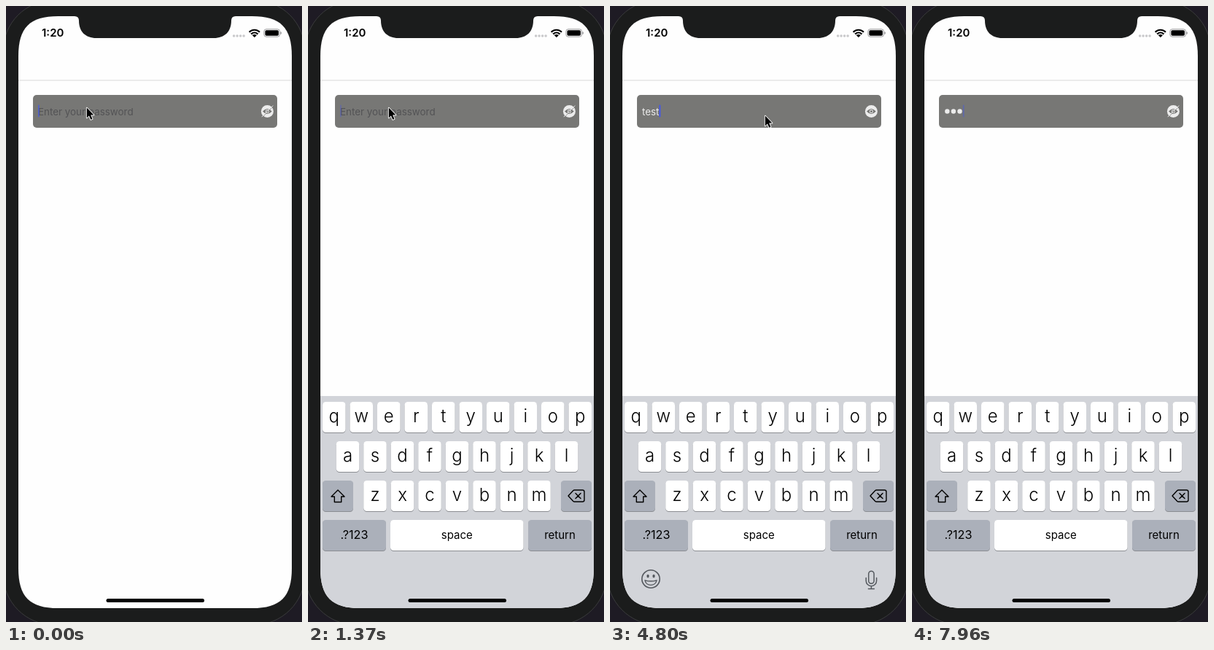
Write an HTML page with a canvas that moves like this. It is 406 px wide and 845 px high and loops after 8 s.

```html
<!DOCTYPE html>
<html lang="en">
<head>
<meta charset="utf-8">
<title>Password field</title>
<style>
html, body { margin: 0; width: 100%; height: 100%; overflow: hidden; background: #1b1c1c; }
canvas { display: block; width: 406px; height: 845px; }
</style>
</head>
<body>
<canvas id="stage" width="406" height="845"></canvas>
<script>
const ctx = document.getElementById('stage').getContext('2d');
const LOOP = 8000;
const FONT = 'Inter, Roboto, sans-serif';
const FIELD_FONT = `400 13.4px ${FONT}`;
const SCREEN = { x: 17, y: 14, w: 375, h: 812, r: 39 };
const KEYBOARD_HEIGHT = 291;

const KEYBOARD_AT = 665, REVEAL_AT = 3400, DELETE_AT = 6340, MASK_AT = 7500;
const TYPED_AT = [1780, 1960, 2140, 2310];

// The caret restarts its blink whenever the field is touched.
const BLINK_PERIOD = 870;
const BLINK_STARTS = [-440, 900, ...TYPED_AT, 2560, 3840, MASK_AT];

const GLIDE = 360, POINTER_HIDES_AT = 7880;
const POINTER_HOME = { x: 110, y: 139 };
const POINTER_STOPS = [
  { at: 2840, x: 318, y: 147 },
  { at: 3240, x: 354, y: 143 },
  { at: 4160, x: 348, y: 209 },
  { at: 4800, x: 212, y: 150 },
  { at: 5080, x: 395, y: 150 },
  { at: 5200, x: 353, y: 145 },
  { at: 5680, x: 306, y: 145 },
  { at: 6920, x: 390, y: 153 },
  { at: 7210, x: 356, y: 143 }
];

const clamp = v => Math.min(1, Math.max(0, v));
const smooth = v => v * v * (3 - 2 * v);
const revealed = t => t >= REVEAL_AT && t < MASK_AT;

function caretOpacity(t) {
  const start = BLINK_STARTS.filter(s => s <= t).pop();
  const phase = (t - start) % BLINK_PERIOD;
  return Math.max(clamp((500 - phase) / 90), clamp((phase - 800) / 70));
}

function pointerAt(t) {
  let pos = POINTER_HOME, arrived = 0;
  for (const stop of POINTER_STOPS) {
    const start = Math.max(arrived, stop.at - GLIDE);
    const k = smooth(clamp((t - start) / (stop.at - start)));
    pos = { x: pos.x + (stop.x - pos.x) * k, y: pos.y + (stop.y - pos.y) * k };
    arrived = stop.at;
  }
  return pos;
}

// Critically damped spring: 1 at the start, settling to 0.
function springLeft(ms) {
  const u = ms * .0151;
  return u > 9 ? 0 : (1 + u) * Math.exp(-u);
}

function roundRect(x, y, w, h, r, fill) {
  ctx.beginPath();
  ctx.roundRect(x, y, w, h, r);
  ctx.fillStyle = fill;
  ctx.fill();
}

function circle(x, y, r, fill) {
  ctx.beginPath();
  ctx.arc(x, y, r, 0, Math.PI * 2);
  ctx.fillStyle = fill;
  ctx.fill();
}

function text(str, x, y, font, color, align = 'left') {
  ctx.font = font;
  ctx.fillStyle = color;
  ctx.textAlign = align;
  ctx.fillText(str, x, y);
}

function strokePath(d, color, width, x = 0, y = 0) {
  ctx.save();
  ctx.translate(x, y);
  ctx.strokeStyle = color;
  ctx.lineWidth = width;
  ctx.lineCap = ctx.lineJoin = 'round';
  ctx.stroke(new Path2D(d));
  ctx.restore();
}

// Rounded rectangle whose corners ease into the sides.
function softRect({ x, y, w, h, r }) {
  const reach = r * 1.4, pull = r * .4;
  ctx.beginPath();
  for (let i = 0; i < 4; i++) {
    const right = i === 1 || i === 2, bottom = i > 1;
    const cx = x + (right ? w : 0), cy = y + (bottom ? h : 0);
    const dx = right ? -1 : 1, dy = bottom ? -1 : 1;
    const onSide = d => [cx, cy + dy * d], onEdge = d => [cx + dx * d, cy];
    const [from, to] = i % 2 ? [onEdge, onSide] : [onSide, onEdge];
    ctx.lineTo(...from(reach));
    ctx.bezierCurveTo(...from(pull), ...to(pull), ...to(reach));
  }
  ctx.closePath();
}

function drawBody() {
  ctx.fillStyle = '#1e1b24';
  ctx.fillRect(0, 0, 406, 845);
  roundRect(-4, -8, 414, 857, 70, '#1b1c1c');
  ctx.strokeStyle = '#3a3b3c';
  ctx.lineWidth = 1;
  ctx.stroke();
}

function drawNotch() {
  ctx.fillStyle = '#1b1c1c';
  ctx.fill(new Path2D('M94 13V14Q100 14 100 20C100 35 109 44 124 44H285C300 44 309 35 309 20Q309 14 315 14V13Z'));
}

function drawStatus() {
  text('1:20', 49, 42.3, `600 15px ${FONT}`, '#000');
  for (let i = 0; i < 4; i++) circle(312.6 + i * 4.5, 41, 1.75, '#c9c9cb');

  ctx.save();
  ctx.clip(new Path2D('M340.8 43L330.8 33V28H350.8V33Z'));
  for (const r of [10.8, 7, 3.4]) {
    circle(340.8, 42.5, r, '#000');
    if (r > 4) circle(340.8, 42.5, r - 2.1, '#fefefe');
  }
  ctx.restore();

  ctx.beginPath();
  ctx.roundRect(353.9, 31.8, 21.6, 10.4, 3);
  ctx.strokeStyle = '#99999b';
  ctx.lineWidth = 1;
  ctx.stroke();
  roundRect(355.4, 33.3, 18.6, 7.4, 1.8, '#000');
  roundRect(376.5, 35.2, 1.4, 3.8, [0, 1.4, 1.4, 0], '#99999b');
}

function drawEye(slashed) {
  const gray = '#777775', light = '#ececec', x = 358.4, y = 144.5;
  circle(x, y, 8.5, light);
  ctx.fillStyle = gray;
  ctx.beginPath();
  ctx.moveTo(x - 6.4, y);
  ctx.quadraticCurveTo(x, y - 7.2, x + 6.4, y);
  ctx.quadraticCurveTo(x, y + 7.2, x - 6.4, y);
  ctx.fill();
  circle(x, y, 2.5, light);
  circle(x, y, 1.6, gray);
  if (slashed) {
    strokePath('M-5.5 5.5L5.5 -5.5', gray, .7, x + .6, y + .7);
    strokePath('M-7.4 7.4L7.6 -7.6', light, 1, x, y);
  }
}

function drawField(t) {
  const left = 44, base = 149.5, ink = '#ececec';
  const length = t >= DELETE_AT ? 3 : TYPED_AT.filter(at => t >= at).length;
  const value = 'test'.slice(0, length);
  let end = left;

  roundRect(37, 122, 335, 45, 5, '#777775');
  if (!value) {
    text('Enter your password', left, base, FIELD_FONT, '#535355');
  } else {
    const bullets = revealed(t) ? 0 : t < REVEAL_AT ? length - 1 : length;
    const rest = value.slice(bullets);
    for (let i = 0; i < bullets; i++) circle(48.3 + i * 8.6, 144.5, 3.2, ink);
    end += bullets * 8.6;
    text(rest, end, base, FIELD_FONT, ink);
    end += ctx.measureText(rest).width;
  }
  ctx.globalAlpha = caretOpacity(t);
  roundRect(end, 135.5, 1.8, 17, .9, '#4156f0');
  ctx.globalAlpha = 1;
  drawEye(!revealed(t));
}

function key(x, y, w, fill) {
  roundRect(x, y + 1, w, 42, 4.5, '#8b8d92');
  roundRect(x, y, w, 42, 4.5, fill);
}

function letterRow(letters, x, y) {
  [...letters].forEach((ch, i) => {
    const left = x + i * 37.5;
    key(left, y, 31.5, '#fff');
    text(ch, left + 15.75, y + 28, `300 24px ${FONT}`, '#000', 'center');
  });
}

function wideKey(label, size, x, w, fill) {
  key(x, 170, w, fill);
  text(label, x + w / 2, 196, `400 ${size}px ${FONT}`, '#000', 'center');
}

function drawEmojiAndMic() {
  const ink = '#54585e';
  ctx.beginPath();
  ctx.arc(56, 251, 12.2, 0, Math.PI * 2);
  ctx.strokeStyle = ink;
  ctx.lineWidth = 1.6;
  ctx.stroke();
  for (const x of [52, 60]) roundRect(x - 1.5, 244.8, 3, 4.4, 1.5, ink);
  strokePath('M-8 1.8Q0 4.2 8 1.8C6.5 10.5 -6.5 10.5 -8 1.8Z', ink, 1.4, 56, 251);
  strokePath('M-3.7 -7.5A3.7 3.7 0 0 1 3.7 -7.5V2A3.7 3.7 0 0 1 -3.7 2ZM-7.2 -2V2A7.2 7.2 0 0 0 7.2 2V-2M0 9.2V13M-4 13H4', ink, 1.5, 358.4, 251.5);
}

function drawKeyboard(t) {
  if (t < KEYBOARD_AT) return;
  const gray = '#abb0ba';
  const top = SCREEN.y + SCREEN.h - KEYBOARD_HEIGHT;
  ctx.save();
  ctx.translate(0, top + KEYBOARD_HEIGHT * springLeft(t - KEYBOARD_AT));
  ctx.fillStyle = '#d2d4d9';
  ctx.fillRect(SCREEN.x, 0, SCREEN.w, KEYBOARD_HEIGHT);
  letterRow('qwertyuiop', 20, 8);
  letterRow('asdfghjkl', 38.75, 62);
  letterRow('zxcvbnm', 76.25, 116);
  key(20, 116, 42, gray);
  key(347, 116, 42, gray);
  strokePath('M0 -8.5L9 .5H4.7V8H-4.7V.5H-9Z', '#000', 1.4, 41, 137.5);
  strokePath('M-11 0L-4.3 -7.3Q-3.6 -8 -2.5 -8H8.5Q11 -8 11 -5.5V5.5Q11 8 8.5 8H-2.5Q-3.6 8 -4.3 7.3ZM-1 -3.6L6 3.6M6 -3.6L-1 3.6', '#000', 1.4, 368, 137);
  wideKey('.?123', 16.2, 20, 87, gray);
  wideKey('space', 15, 113, 182.5, '#fff');
  wideKey('return', 15, 302, 87, gray);
  if (revealed(t)) drawEmojiAndMic();
  ctx.restore();
}

function drawPointer(t) {
  if (t >= POINTER_HIDES_AT) return;
  const arrow = 'M.8 .6V14.4L3.9 11.4L6.3 16.8L8.5 15.9L6.2 10.6H10.4Z';
  const { x, y } = pointerAt(t);
  strokePath(arrow, '#fff', 1.8, x, y);
  ctx.save();
  ctx.translate(x, y);
  ctx.fillStyle = '#000';
  ctx.fill(new Path2D(arrow));
  ctx.restore();
}

function draw(t) {
  drawBody();
  ctx.save();
  softRect(SCREEN);
  ctx.fillStyle = '#fefefe';
  ctx.fill();
  ctx.clip();
  drawStatus();
  ctx.fillStyle = '#dadada';
  ctx.fillRect(SCREEN.x, 101.5, SCREEN.w, 1);
  drawField(t);
  drawKeyboard(t);
  roundRect(137.5, 813, 134.5, 5, 2.5, '#000');
  ctx.restore();
  drawNotch();
  drawPointer(t);
}

const start = performance.now();
function tick() {
  draw((performance.now() - start) % LOOP);
  requestAnimationFrame(tick);
}
tick();
</script>
</body>
</html>
```
